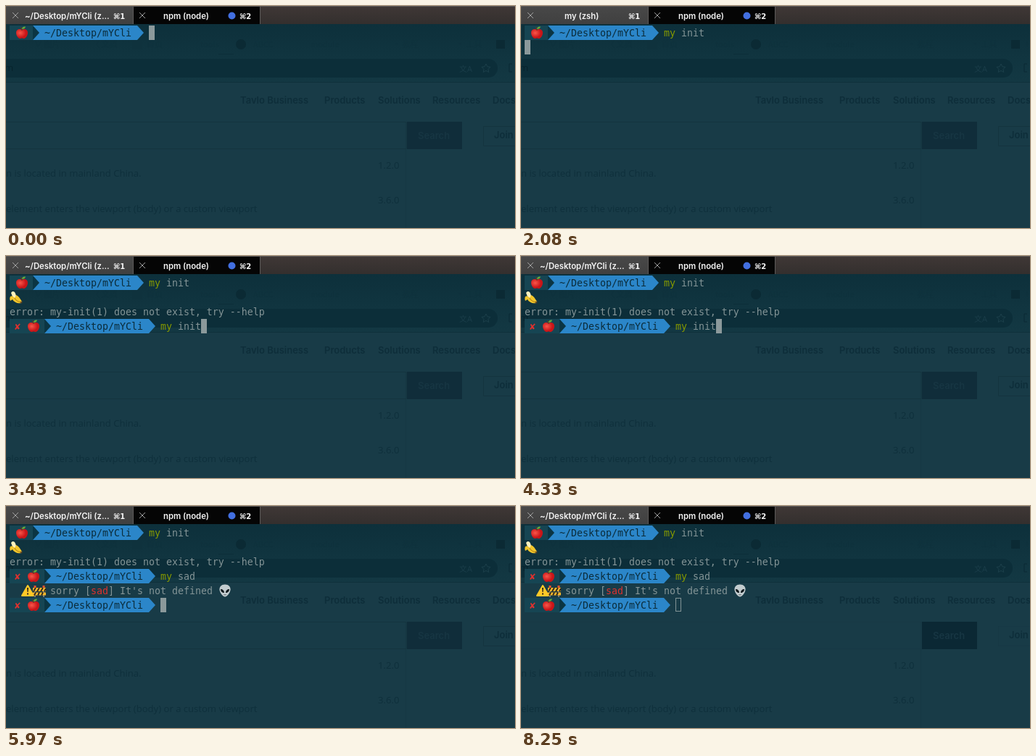
An HTML page that plays this animation: 702 by 307 pixels, repeating every 8.35 s.

```html
<!DOCTYPE html>
<html lang="en">
<head>
<meta charset="utf-8">
<title>Terminal session</title>
<style>
  html, body { margin: 0; width: 100%; height: 100%; overflow: hidden; background: #183b47; }
  svg { display: block; width: 702px; height: 307px; }
  text { white-space: pre; }
  .tabs { font: 600 11.3px Inter, sans-serif; fill: #f4f4f4; }
  .key { font: bold 10px "DejaVu Sans", sans-serif; }
  .nav { font: 600 13px Inter, "Open Sans", sans-serif; fill: #0e2e3a; }
  .page { font: 500 13.1px "Open Sans", sans-serif; fill: #0f303c; }
  .faint { font: 11px "Noto Sans CJK SC", "Noto Sans", sans-serif; fill: #0f323d; }
  .outline { fill: none; stroke: #14343f; }
  .unfocused .outline { opacity: .3; }
  .unfocused .search { fill: #0b2834; }
  #terminal { font: 13.29px "DejaVu Sans Mono", monospace; fill: #839496; }
  .command { fill: #859900; }
  .red { fill: #dc322f; }
  .path { fill: #0b2c3a; }
</style>
</head>
<body>
<svg id="stage" viewBox="0 0 702 307">
  <defs>
    <linearGradient id="activeTab" x2="0" y2="1">
      <stop stop-color="#484848"/><stop offset="1" stop-color="#404040"/>
    </linearGradient>
    <linearGradient id="titleBar" x2="0" y2="1">
      <stop stop-color="#403836"/><stop offset="1" stop-color="#332f2e"/>
    </linearGradient>
    <linearGradient id="browserTop" x2="0" y2="1">
      <stop stop-color="#0d303b"/><stop offset="1" stop-color="#133843"/>
    </linearGradient>
    <radialGradient id="appleSkin" cx=".35" cy=".4">
      <stop stop-color="#f8574a"/><stop offset="1" stop-color="#c91518"/>
    </radialGradient>
    <g id="apple">
      <path d="M9 5C6 3 1 4 1 9c0 4 3 8 5 8 1.300 0 2-.6 3-.6s1.700.6 3 .6c2 0 5-4 5-8 0-5-5-6-8-4z" fill="url(#appleSkin)"/>
      <path d="M9 6C9 4 8.500 2.500 7.500 1.500" fill="none" stroke="#6b3d20" stroke-width="1.200"/>
      <path d="M9 4c0-3 2-4 5-3.500C13.500 3 12 4 9 4z" fill="#67a83a"/>
    </g>
    <g id="banana">
      <path d="M2 3C4-.5 7 1 8 4l2 6-5 1z" fill="#fff1bd"/>
      <path d="M1 8c3-1 4 0 6 2l2-4c3 1 5 4 8 9l-1 2c-5 1-10-1-12-5l-3 2c-1-2-1-4 0-6z" fill="#f2c62c"/>
      <path d="M7 10c1 3 4 5 9 6" fill="none" stroke="#a87912"/>
      <path d="M15.500 14.500l2 1-1 2-2-1z" fill="#664522"/>
    </g>
    <g id="warning">
      <path d="M9 2L17 16H1z" fill="#ffc928" stroke="#ffc928" stroke-width="2" stroke-linejoin="round"/>
      <path d="M8 5h2l-.4 6H8.400zM8 12.500h2v2H8z" fill="#30271a"/>
    </g>
    <g id="barrier">
      <path d="M3 5v13M15 5v13" stroke="#777" stroke-width="2"/>
      <path d="M0 5h18v5H0zM0 11.500h18v4H0z" fill="#f5b62b"/>
      <path d="M1 10l3-5M6 10l3-5M11 10l3-5M16 10l2-4M2 15.500l2-4M7 15.500l2-4M12 15.500l2-4" stroke="#29251f" stroke-width="1.800"/>
      <path d="M3 2v3M15 2v3" stroke="#e9542f" stroke-width="3"/>
    </g>
    <g id="alien">
      <path d="M9 .5C4 .5 1 4 1.500 8 2 12 6 17.500 9 17.500s7-5.500 7.500-9.500C17 4 14 .5 9 .5z" fill="#c3cccf"/>
      <path d="M3 7c3 0 5 2 5 5-3 0-5-2-5-5zM15 7c-3 0-5 2-5 5 3 0 5-2 5-5z" fill="#11191d"/>
      <path d="M7.500 14.500q1.500 1 3 0" fill="none" stroke="#485359"/>
    </g>
  </defs>

  <!-- Browser showing through the terminal -->
  <rect width="702" height="307" fill="#183b47"/>
  <rect y="24" width="702" height="81" fill="url(#browserTop)"/>
  <path d="M0 105.500H702" stroke="#0f303b"/>
  <path d="M0 73H665a13 13 0 0 1 0 26H0z" fill="#0c2e39"/>
  <g class="faint">
    <text x="39" y="57">∨ 图片</text><text x="118" y="57">〈 文档</text>
    <rect x="174" y="46" width="14" height="14"/>
    <text x="194" y="57">首页</text><text x="268" y="57">tools</text>
    <circle cx="324" cy="53" r="7" fill="#0b2a34"/>
    <text x="341" y="57">ABCC</text><text x="420" y="57">module</text>
    <text x="533" y="57">▪ 教程</text><text x="621" y="57">▪ 工具</text>
    <path d="M293 66.500H314" stroke="#0d2e39"/>
    <rect x="676" y="47" width="12" height="12" fill="#0b2a34"/>
    <text x="695" y="57">+</text>
  </g>
  <g class="page">
    <text x="-2" y="90" fill="#08232d">m</text>
    <text x="625" y="91" font-size="11" fill="#1a3d49">文A</text>
    <path d="M662 80l1.800 3.800 4.200.6-3 3 .7 4.100-3.700-2-3.700 2 .7-4.100-3-3 4.200-.6z" fill="none" stroke="#1c404b"/>
    <path d="M698 80h-4v11h4" fill="none" stroke="#0a2934"/>
    <text x="0" y="235.500">n is located in mainland China.</text>
    <text x="513" y="225">1.2.0</text>
    <text x="0" y="284.500">element enters the viewport (body) or a custom viewport</text>
    <text x="513" y="273">3.6.0</text>
  </g>
  <path class="outline" d="M-1 160.500H552V197.500H-1M702 166.500H658.500V193.500H702"/>
  <path class="outline" d="M551.500 198V307" opacity=".4"/>
  <rect class="search" x="553" y="160" width="76" height="38" fill="#102d3a"/>
  <g class="nav">
    <text x="323" y="135">Tavlo Business</text><text x="439" y="135">Products</text>
    <text x="513" y="135">Solutions</text><text x="588" y="135">Resources</text>
    <text x="671" y="135">Docs</text><text x="673" y="183">Join</text>
    <text x="568" y="184" fill="#173643">Search</text>
  </g>

  <g class="tabs">
    <rect width="702" height="25" fill="url(#titleBar)"/>
    <rect width="175" height="25" fill="url(#activeTab)"/>
    <rect x="176" width="174" height="25" fill="#050505"/>
    <path d="M0 .5H702M175.500 0V25M350.500 0V25" stroke="#5c5a59"/>
    <path d="M9 9l8 8m0-8l-8 8M184 9l8 8m0-8l-8 8" stroke="#a1a1a1"/>
    <text id="title" y="17.500"></text>
    <text class="key" x="148" y="17.500">⌘1</text>
    <text x="217" y="17.500">npm (node)</text>
    <circle cx="311.500" cy="13.500" r="5" fill="#426fe0"/>
    <text class="key" x="322" y="17.500">⌘2</text>
  </g>
  <g id="terminal"></g>
</svg>
<script>
const CELL = 8, LEFT = 5, TOP = 27, ROW = 20, LOOP = 8350;
const stage = document.getElementById('stage');
const title = document.getElementById('title');
const terminal = document.getElementById('terminal');

const rowTop = row => TOP + row * ROW;
const label = (x, row, content, style = '') =>
  `<text x="${x}" y="${rowTop(row) + 14.5}" class="${style}">${content}</text>`;
const icon = (name, x, row) =>
  `<use href="#${name}" x="${x}" y="${rowTop(row) + 1}"/>`;

function cursor(x, row, hollow = false) {
  const y = rowTop(row);
  return hollow
    ? `<rect x="${x + .5}" y="${y + .5}" width="7" height="18" fill="none" stroke="#839496"/>`
    : `<rect x="${x}" y="${y}" width="8" height="20" fill="#8b999b"/>`;
}

function prompt(row, command = '', failed = false) {
  const shift = failed ? 16 : 0, y = rowTop(row), split = 37 + shift;
  const [name, ...args] = command.split(' ');
  const rest = args.length ? ' ' + args.join(' ') : '';
  return `<path d="M${split} ${y}h144l9 10-9 10h-144z" fill="#2b86c9"/>
    <path d="M5 ${y}H${split}v20H5z" fill="#164553"/>
    <path d="M${split} ${y}l9 10-9 10z" fill="#0b3543"/>`
    + (failed ? label(12, row, '✘', 'red') : '')
    + icon('apple', 13 + shift, row)
    + label(53 + shift, row, '~/Desktop/mYCli', 'path')
    + label(197 + shift, row, `<tspan class="command">${name}</tspan>${rest}`);
}

function editing(row, command, failed, hollow) {
  const x = (failed ? 213 : 197) + command.length * CELL;
  return prompt(row, command, failed) + cursor(x, row, hollow);
}

const firstRun = () => prompt(0, 'my init') + icon('banana', LEFT, 1)
  + label(LEFT, 2, 'error: my-init(1) does not exist, try --help');
const secondRun = () => firstRun() + prompt(3, 'my sad', true);
const finished = hollow => secondRun()
  + icon('warning', 21, 4) + icon('barrier', 37, 4)
  + label(61, 4, `sorry [<tspan class="red">sad</tspan>] It's not defined`)
  + icon('alien', 293, 4) + editing(5, '', true, hollow);

const scenes = [
  [0, () => editing(0, '')],
  [740, () => editing(0, 'clear')],
  [1490, () => editing(0, 'my init')],
  [2080, () => prompt(0, 'my init') + cursor(LEFT, 1), true],
  [2680, () => firstRun() + editing(3, '', true)],
  [3430, () => firstRun() + editing(3, 'my init', true)],
  [3730, () => firstRun() + editing(3, 'clear', true)],
  [4330, () => firstRun() + editing(3, 'my init', true)],
  [5080, () => firstRun() + editing(3, 'my sad', true)],
  [5670, () => secondRun() + cursor(LEFT, 4), true],
  [5970, () => finished(false)],
  [8250, () => finished(true)]
];

let shown;
function render(now) {
  const time = now % LOOP;
  const scene = scenes.findLast(([start]) => start <= time);
  if (scene !== shown) {
    const [, draw, running] = shown = scene;
    terminal.innerHTML = draw();
    title.textContent = running ? 'my (zsh)' : '~/Desktop/mYCli (z...';
    title.setAttribute('x', running ? 60 : 26);
  }
  stage.classList.toggle('unfocused', time >= 7770);
}

const origin = performance.now();
function tick() {
  render(performance.now() - origin);
  requestAnimationFrame(tick);
}
tick();
</script>
</body>
</html>
```
